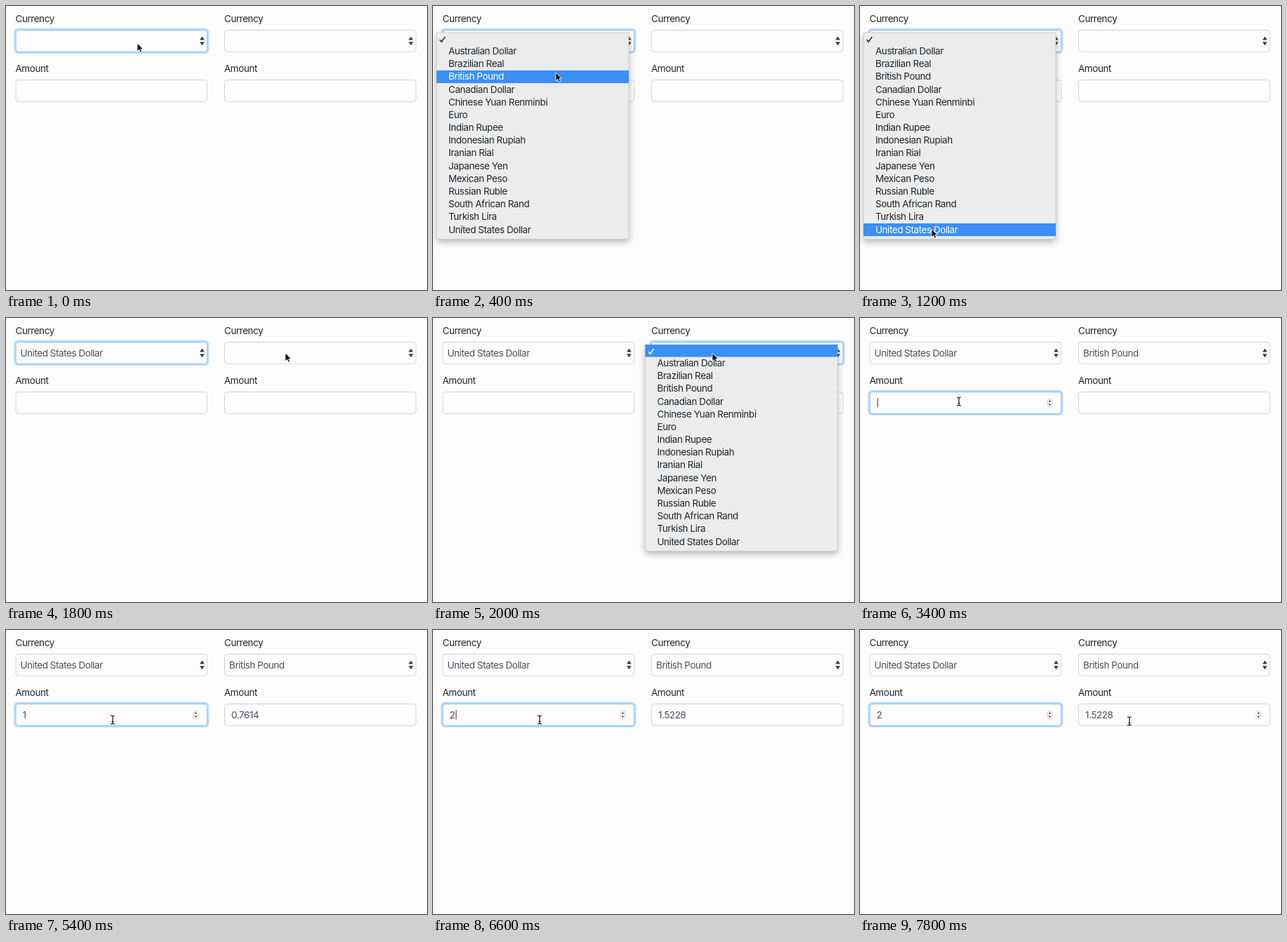
Animation, 600 px wide and 405 px high, one loop 8000 ms. Source, as an HTML page:

```html
<!DOCTYPE html>
<html lang="en">
<head>
<meta charset="utf-8">
<title>Currency converter</title>
<style>
  html, body { margin: 0; width: 100%; height: 100%; overflow: hidden; background: #fefdfe; }
  svg { display: block; width: 100%; height: 100%; }
  text { font: 13.5px Inter, Roboto, sans-serif; letter-spacing: -.45px; fill: #212529; white-space: pre; }
  .value { fill: #495057; }
  .box { fill: #fefdfe; stroke: #ced4da; }
  .ring { fill: none; stroke: #bfdeff; stroke-width: 3; visibility: hidden; }
  .focus .box { stroke: #80bdff; }
  .focus .ring { visibility: visible; }
  .arrows { fill: #343a40; }
  .spinner { fill: #fefdfe; stroke: #c4c4c4; stroke-width: .8; }
  .spinner path { fill: #555; stroke: none; }
  .panel { fill: #ececec; stroke: #c3c3c3; stroke-width: .6; filter: drop-shadow(0 4px 5px rgba(0, 0, 0, .28)); }
  .highlight { fill: #3b8ff5; }
  .tick { fill: none; stroke: #222; stroke-width: 1.5; }
  .menu .active { fill: #fff; }
  .pointer { fill: #000; stroke: #fff; stroke-width: .9; }
  .beam { fill: none; stroke: #111; stroke-width: 1.2; }
</style>
</head>
<body>
<svg id="stage" viewBox="0 0 600 405"></svg>
<script>
const LOOP = 8000, STEP = 200, ROW = 18.18, COLUMN = 297.5;
const stage = document.getElementById('stage');
const currencies = ['Australian Dollar', 'Brazilian Real', 'British Pound', 'Canadian Dollar',
  'Chinese Yuan Renminbi', 'Euro', 'Indian Rupee', 'Indonesian Rupiah', 'Iranian Rial',
  'Japanese Yen', 'Mexican Peso', 'Russian Ruble', 'South African Rand', 'Turkish Lira',
  'United States Dollar'];

// Pointer stops: [time, x, y]
const stops = [[0, 187, 53], [200, 187, 53], [400, 175, 95], [600, 155, 160], [800, 132, 235],
  [1000, 112, 290], [1200, 102, 318], [1400, 128, 290], [1600, 290, 150], [1800, 398, 50],
  [2000, 398, 50], [2800, 373, 99], [3000, 370, 102], [3200, 230, 114], [3400, 141, 119],
  [4800, 141, 119], [5000, 152, 128], [7000, 152, 128], [7200, 172, 128], [7400, 250, 129],
  [7600, 345, 130], [7800, 384, 130]];

function add(parent, tag, attrs = {}, text = '') {
  const node = document.createElementNS('http://www.w3.org/2000/svg', tag);
  for (const name in attrs) node.setAttribute(name, attrs[name]);
  node.textContent = text;
  return parent.appendChild(node);
}

const group = (parent, cls, x = 0, y = 0) =>
  add(parent, 'g', { class: cls, transform: `translate(${x} ${y})` });

const show = (node, on) => node.setAttribute('visibility', on ? 'visible' : 'hidden');

function setText(node, text) {
  if (node.textContent !== text) node.textContent = text;
}

function makeField(parent, label, y, textX) {
  const root = group(parent, 'field', 0, y);
  add(root, 'text', { x: 13.5, y: -11.5 }, label);
  add(root, 'rect', { class: 'ring', x: 12.5, y: -1, width: 275.5, height: 33.5, rx: 4.5 });
  add(root, 'rect', { class: 'box', x: 14, y: .5, width: 272.7, height: 30.8, rx: 3.6 });
  return { root, value: add(root, 'text', { class: 'value', x: textX, y: 21 }) };
}

function makeColumn(x) {
  const root = group(stage, 'column', x);
  const select = makeField(root, 'Currency', 34, 20.5);
  add(select.root, 'path', { class: 'arrows', d: 'M276.2 14.6l3.3-5 3.3 5zM276.2 17.2l3.3 5 3.3-5z' });
  const amount = makeField(root, 'Amount', 105, 23.6);
  const spinner = group(amount.root, 'spinner', 270.5, 16);
  add(spinner, 'rect', { x: -3.3, y: -6, width: 6.6, height: 12, rx: 3 });
  add(spinner, 'path', { d: 'M-2-1.6l2-2.6 2 2.6zM-2 1.6l2 2.6 2-2.6z' });
  return { select, amount, spinner };
}

function makeMenu(x) {
  const root = group(stage, 'menu', x);
  add(root, 'path', { class: 'panel',
    d: 'M5 38H279V328q0 4.5-4.5 4.5H9.5Q5 332.5 5 328z' });
  const highlight = add(root, 'rect', { class: 'highlight', x: 5, width: 274, height: ROW });
  const tick = add(root, 'path', { class: 'tick', d: 'M9.5 48l2.7 3.2 5-7.4' });
  const items = currencies.map((name, i) =>
    add(root, 'text', { x: 22, y: 69 + i * ROW }, name));
  return { root, highlight, tick, items };
}

const left = makeColumn(0), right = makeColumn(COLUMN);
const leftMenu = makeMenu(0), rightMenu = makeMenu(COLUMN);
const caret = add(stage, 'rect', { y: 114, width: 1, height: 13.5, fill: '#333' });
const pointer = add(stage, 'path', { class: 'pointer',
  d: 'M0 0V11.6L2.7 9.2 4.5 13.2 6.6 12.3 4.8 8.4H8.4z' });
const beam = add(stage, 'path', { class: 'beam',
  d: 'M-3-6Q0-6 0-4.2Q0-6 3-6M0-4.5V4.5M-3 6Q0 6 0 4.2Q0 6 3 6M-1.5 2.5H1.5' });

function pointerAt(t) {
  const next = stops.findIndex(stop => stop[0] > t);
  if (next < 0) return stops[stops.length - 1].slice(1);
  const [t0, x0, y0] = stops[next - 1], [t1, x1, y1] = stops[next];
  const k = (t - t0) / (t1 - t0);
  return [x0 + (x1 - x0) * k, y0 + (y1 - y0) * k];
}

function drawMenu(menu, open, y) {
  show(menu.root, open);
  if (!open) return;
  const row = Math.max(-1, Math.floor((y - 55.5) / ROW));
  const top = row < 0 ? 38 : 55.5 + row * ROW;
  menu.highlight.setAttribute('y', top);
  menu.highlight.setAttribute('height', 55.5 + (row + 1) * ROW - top);
  menu.tick.style.stroke = row < 0 ? '#fff' : '';
  menu.items.forEach((item, i) => item.classList.toggle('active', i === row));
}

function draw(t) {
  const [x, y] = pointerAt(t);
  const typing = t >= 3400;
  const overAmount = (from, to) => y > 104 && y < 137 && x > from && x < to && t >= 3000;
  const overLeft = overAmount(14, 287), overRight = overAmount(311, 585);

  left.select.root.classList.toggle('focus', t < 2000);
  right.select.root.classList.toggle('focus', t >= 2000 && !typing);
  left.amount.root.classList.toggle('focus', typing);

  const amount = t >= 6200 ? 2 : t >= 4000 ? 1 : 0;
  setText(left.select.value, t >= 1400 ? 'United States Dollar' : '');
  setText(right.select.value, t >= 3000 ? 'British Pound' : '');
  setText(left.amount.value, amount ? String(amount) : '');
  setText(right.amount.value, amount ? (amount * .7614).toFixed(4) : '');
  show(left.spinner, typing || overLeft);
  show(right.spinner, overRight);

  drawMenu(leftMenu, t >= 200 && t < 1400, y);
  drawMenu(rightMenu, t >= 2000 && t < 3000, y);

  const blinkStart = t >= 6200 ? 6200 : t >= 4000 ? 3900 : 3400;
  show(caret, typing && (t - blinkStart) % 1000 < 500);
  caret.setAttribute('x', amount ? 32.5 : 24.7);

  const overText = overLeft || overRight;
  show(pointer, !overText);
  show(beam, overText);
  (overText ? beam : pointer).setAttribute('transform', `translate(${x} ${y})`);
}

let shown = -1;
const start = performance.now();
function tick(now) {
  const elapsed = Math.max(0, now - start) % LOOP;
  const t = Math.floor(elapsed / STEP) * STEP;
  if (t !== shown) draw(shown = t);
  requestAnimationFrame(tick);
}
draw(0);
requestAnimationFrame(tick);
</script>
</body>
</html>
```
